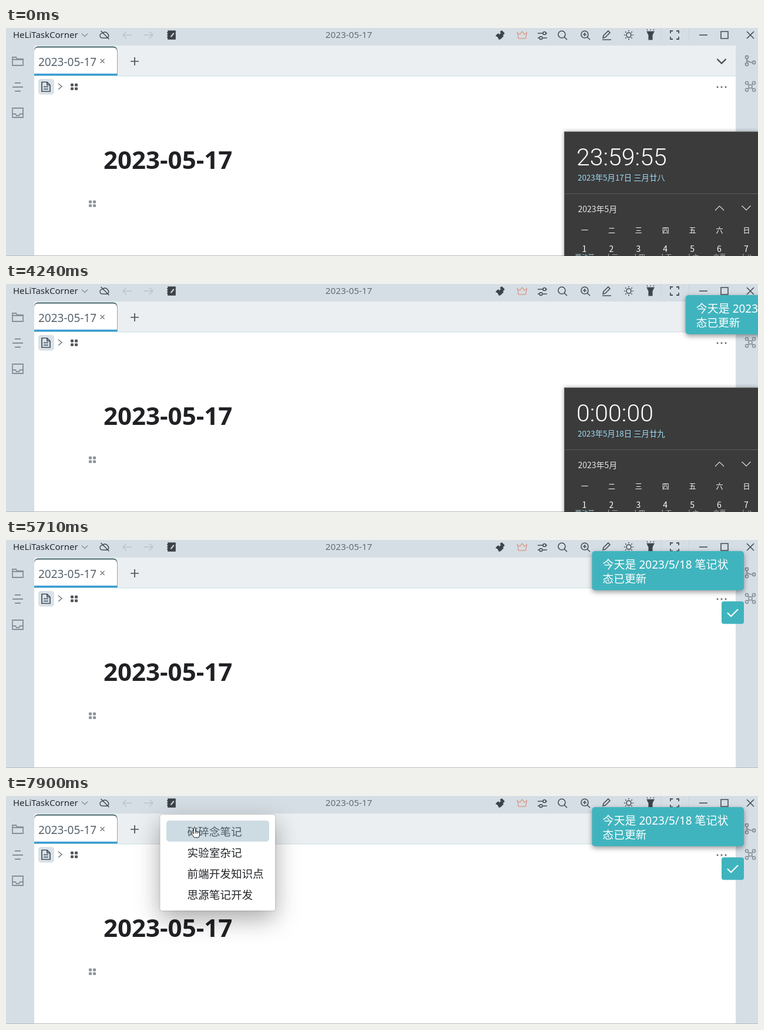
Animation, 1280 px wide and 390 px high, one loop 8000 ms. Source, as an HTML page with a canvas:

```html
<!DOCTYPE html>
<html lang="zh">
<head>
<meta charset="utf-8">
<title>Daily note</title>
<style>
  html, body { margin: 0; width: 100%; height: 100%; overflow: hidden; background: #fff; }
  canvas { display: block; }
</style>
</head>
<body>
<canvas id="stage" width="1280" height="390"></canvas>
<script>
const ctx = document.getElementById('stage').getContext('2d');
const LOOP = 8000;
const SANS = '"Noto Sans", "Noto Sans CJK SC", sans-serif';
const CJK = '"Noto Sans CJK SC", "Noto Sans", sans-serif';
const LIGHT = 'Roboto, "Noto Sans", sans-serif';
const DARK = '#454d54', GREY = '#868f97', BAR = '#d6dee5', TEAL = '#40b4be';

function rect(x, y, w, h, color) {
  ctx.fillStyle = color;
  ctx.fillRect(x, y, w, h);
}

function round(x, y, w, h, r, color) {
  ctx.fillStyle = color;
  ctx.beginPath();
  ctx.roundRect(x, y, w, h, r);
  ctx.fill();
}

function text(str, x, y, size, color, { font = SANS, weight = 400, align = 'left' } = {}) {
  ctx.font = `${weight} ${size}px ${font}`;
  ctx.textAlign = align;
  ctx.fillStyle = color;
  ctx.fillText(str, x, y);
}

// Paths are drawn around their own centre.
function icon(d, x, y, { color = DARK, width = 1.6, fill } = {}) {
  const path = new Path2D(d);
  ctx.save();
  ctx.translate(x, y);
  if (fill) { ctx.fillStyle = fill; ctx.fill(path); }
  if (width) {
    ctx.strokeStyle = color;
    ctx.lineWidth = width;
    ctx.stroke(path);
  }
  ctx.restore();
}

function withShadow(color, blur, dy, draw) {
  ctx.save();
  ctx.shadowColor = color;
  ctx.shadowBlur = blur;
  ctx.shadowOffsetY = dy;
  draw();
  ctx.restore();
}

function circle(r, cx = 0, cy = 0) {
  return `M${cx + r} ${cy}A${r} ${r} 0 1 1 ${cx - r} ${cy}A${r} ${r} 0 1 1 ${cx + r} ${cy}Z`;
}

function blocks(x, y, color) {
  for (const dx of [-6, 1]) for (const dy of [-5.5, 1]) round(x + dx, y + dy, 5, 4.8, 1, color);
}

function topBar(hover) {
  rect(0, 0, 1280, 30, BAR);
  if (hover) rect(262, 0, 37, 30, '#c5cdd4');
  text('HeLiTaskCorner', 12, 17, 15, '#25292d');
  icon('M-5 -2.5L0 2.5L5 -2.5', 134, 12, { color: GREY, width: 1.3 });
  icon('M-5 5H4A4 4 0 0 0 4.5 -2A5 5 0 0 0 -4 -3A4 4 0 0 0 -5 5M-7 -7L7 7', 168.5, 12, { width: 1.5 });
  icon('M8 0H-7M-1 -6L-7 0L-1 6', 206, 12, { color: '#bdc5cc', width: 1.5 });
  icon('M-8 0H7M1 -6L7 0L1 6', 243, 12, { color: '#bdc5cc', width: 1.5 });
  icon('M-5 -7H7V7H-5ZM-7 -4H-4M-7 0H-4M-7 4H-4', 281, 12, { color: '#3b4146', fill: '#3b4146' });
  icon('M-1 4L-.5 1.5L4 -4L5.5 -2.5L1 3Z', 281, 12, { width: 0, fill: BAR });
  text('2023-05-17', 583.5, 17, 15.2, '#626b73', { align: 'center' });

  icon('M-8 1L-3 -3L-1 -1L1 -3L0 -6L3 -8L5 -6L8 -3L5 0L6 2L1 7L-2 8L-4 4Z', 841, 12, { width: 0, fill: '#3d444a' });
  icon('M-6 6H6L8 -4L4 -1L0 -6L-4 -1L-8 -4Z', 878.5, 12, { color: '#d9a08d', width: 1.5 });
  icon('M-8 -4H1M6 -4H8M-8 4H-5M1 4H8' + circle(2.5, 3.5, -4) + circle(2.5, -2.5, 4), 913, 13);
  icon(circle(6, -1, -1) + 'M3.5 3.5L8 8', 947, 12);
  icon(circle(6, -1, -1) + 'M3.5 3.5L8 8M-4 -1H2M-1 -4V2', 986, 12);
  icon('M-6 5L-5 1L3 -7L6 -4L-2 4ZM-7 8H8', 1022, 12);
  let rays = circle(4);
  for (let i = 0; i < 8; i++) {
    const c = Math.cos(i * Math.PI / 4), s = Math.sin(i * Math.PI / 4);
    rays += `M${6.2 * c} ${6.2 * s}L${8.2 * c} ${8.2 * s}`;
  }
  icon(rays, 1060, 12);
  icon('M-6 -5H6L3 1V9H-3V1ZM-6 -9L-5 -7M0 -9V-7M6 -9L5 -7', 1097, 11, { fill: '#3d444a', width: 1.2 });
  icon('M-7 -3V-7H-3M3 -7H7V-3M7 3V7H3M-3 7H-7V3', 1138, 12, { width: 1.8 });
  rect(1114, 0, 1, 24, '#ccd4db');
  rect(1162, 0, 1, 24, '#ccd4db');
  icon('M-7 0H7', 1187, 12);
  icon('M-6 -6H6V6H-6Z', 1223, 12);
  icon('M-6 -6L6 6M6 -6L-6 6', 1267, 12);
}

function docks() {
  rect(0, 30, 48, 360, BAR);
  rect(1242, 30, 38, 360, BAR);
  const side = { color: GREY, width: 1.8 };
  icon('M-9 7V-7H-3L-1 -4H9V7Z M-9 -3H9', 20, 57, side);
  icon('M-5 -7H5M-9 0H9M-5 7H5', 20, 101, side);
  icon('M-9 -8H9V8H-9ZM-9 2H-4L-2 5H2L4 2H9', 20, 145, side);
  icon(circle(2.5, -6, -6) + circle(2.5, -6, 6) + circle(2.5, 6, 3) + 'M-6 -3.5V3.5M-6 -2Q-5 2 3.5 3', 1267, 56, side);
  icon(circle(2.5, -6, -6) + circle(2.5, 6, -6) + circle(2.5, -6, 6) + circle(2.5, 6, 6) + circle(3)
    + 'M-4 -4L-2 -2M4 -4L2 -2M-4 4L-2 2M4 4L2 2', 1267, 100, { color: GREY, width: 1.5 });
}

function editor() {
  rect(48, 30, 1194, 52, '#ebeff1');
  rect(48, 82, 1194, 308, '#fff');
  rect(189, 81.5, 1053, 1, '#c9dae3');
  round(48, 31.5, 141.5, 50, [7, 7, 0, 0], '#45636e');
  round(48, 33.5, 141, 48, [6, 6, 0, 0], '#fff');
  rect(48, 78, 141, 3.5, '#3b9fd1');
  text('2023-05-17', 55, 65, 19, '#56626b');
  icon('M-3.5 -3.5L3.5 3.5M3.5 -3.5L-3.5 3.5', 164, 56.5, { color: '#6d757b', width: 1.2 });
  icon('M-7 0H7M0 -7V7', 219, 57, { width: 1.7 });
  icon('M-7.5 -3.5L0 4L7.5 -3.5', 1218, 56.5, { width: 2.3 });

  round(55, 87, 27, 27, 5, '#dbe2e8');
  icon('M-7 -8H2L7 -3V8H-7ZM2 -8V-3H7M-4 0H4M-4 4H4', 68, 100.5, { color: '#3f4d58', width: 1.7 });
  icon('M-3 -5L3 0L-3 5', 92, 100, { color: '#747c83' });
  blocks(116, 100.5, '#50575d');
  for (const x of [1211, 1218, 1225]) icon(circle(1.5), x, 101, { width: 0, fill: '#5f686f' });
  text('2023-05-17', 166, 241, 42, '#202124', { weight: 700 });
  blocks(147, 300.5, '#8f9397');
  rect(0, 389, 1280, 1, '#b4babd');
}

function titleTools() {
  round(160, 149.5, 79, 26, 5, '#c1c3c5');
  const white = { color: '#fff', width: 1.5 };
  icon('M-7 7V-3L0 -8L7 -3V7Z' + circle(1, 0, -3), 173.5, 163, white);
  icon(circle(7.5) + 'M-4 2Q0 6.5 4 2M-3 -3V-1M3 -3V-1', 199.5, 162.5, white);
  icon('M-8 -7H8V7H-8ZM-8 5L-3 0L0 3L4 -1L8 4' + circle(1, -4, -3), 226.5, 162.5, white);
}

function clockText(t) {
  if (t >= 4110) return t < 5110 ? '0:00:00' : '0:00:01';
  return '23:59:' + (t < 200 ? 55 : 56 + Math.floor((t - 200) / 990));
}

function calendar(t) {
  const closing = t >= 5640;
  ctx.save();
  if (closing) {
    ctx.globalAlpha = 0.5;
    ctx.translate(0, 20);
  }
  withShadow('rgba(0,0,0,.35)', 7, 0, () => rect(950, 177, 331, 240, '#3b3b3b'));
  rect(950, 177, 330, 1, '#6b6b6b');
  rect(950, 177, 1, 213, '#5a5a5a');
  rect(951, 283, 329, 1, '#5e5e5e');
  text(clockText(t), 971, 235, 41, '#fff', { font: LIGHT, weight: 300 });
  text(t < 4110 ? '2023年5月17日 三月廿八' : '2023年5月18日 三月廿九', 973, 261, 13.4, '#9fdcf5', { font: CJK });
  text('2023年5月', 973.5, 314.5, 14, '#e6e6e6', { font: CJK });
  icon('M-7.5 4L0 -3.5L7.5 4', 1214.5, 308, { color: '#ddd', width: 1.2 });
  icon('M-7.5 -4L0 3.5L7.5 -4', 1260, 308, { color: '#ddd', width: 1.2 });
  const lunar = ['劳动节', '十三', '十四', '十五', '十六', '立夏', '十八'];
  [...'一二三四五六日'].forEach((day, i) => {
    const x = 985 + i * 45.9, centre = { font: CJK, align: 'center' };
    text(day, x, 350.5, 12, '#fff', centre);
    text(i + 1, x - 0.5, 383, 14, '#fff', centre);
    text(lunar[i], x, 395.5, 11, i ? '#b5b5b5' : '#9fbfce', centre);
  });
  ctx.restore();
}

function toast(t) {
  const step = Math.min(4, Math.floor((t - 4110) / 85));
  const left = 1 - step / 4;
  ctx.save();
  ctx.translate(283 * left * left, 0);
  withShadow('rgba(0,0,0,.4)', 9, 3, () => round(997.5, 19, 258.5, 67, 5, TEAL));
  text('今天是 2023/5/18 笔记状', 1015.5, 48.5, 19, '#fff');
  text('态已更新', 1015.5, 72.5, 18.7, '#fff');
  round(1218, 105, 38, 38.5, 4, TEAL);
  icon('M-9 0L-3 6L9 -6', 1237, 124.5, { color: '#fff', width: 2 });
  ctx.restore();
}

function tooltip(alpha) {
  ctx.save();
  ctx.globalAlpha = alpha;
  round(222, 36.5, 77, 30.5, 5, '#658396');
  text('今日笔记', 260.5, 57, 14.6, '#fff', { font: CJK, align: 'center' });
  ctx.restore();
}

function menu(active) {
  withShadow('rgba(0,0,0,.34)', 42, 14, () => round(262.5, 32, 195.5, 164, 4, '#fff'));
  withShadow('rgba(0,0,0,.25)', 3, 0, () => round(262.5, 32, 195.5, 164, 4, '#fff'));
  if (active) round(273, 42, 175, 36, 5, '#cddbe3');
  ['碎碎念笔记', '实验室杂记', '前端开发知识点', '思源笔记开发'].forEach((label, i) =>
    text(label, 308.5, 68 + i * 36, 18.6, i || !active ? '#202326' : '#4a5a66', { font: CJK }));
}

const TRACK = [
  [6170, 572, 314], [6310, 500, 262], [6450, 420, 205], [6590, 345, 145], [6730, 308, 103],
  [6940, 290, 50], [7010, 287, 38], [7080, 284, 26], [7150, 284, 22], [7620, 284, 22],
  [7690, 292, 31], [7760, 304, 43], [7830, 315, 51], [7900, 321, 54], [8000, 321, 54]
];

function pointer(t) {
  const base = t < 7420 ? 6170 : t < 7690 ? 7420 : 7690;
  const now = base + Math.floor((t - base) / 70) * 70;
  const i = Math.max(1, TRACK.findIndex(p => p[0] > now));
  const [a, b] = [TRACK[i - 1], TRACK[i]];
  const k = (now - a[0]) / (b[0] - a[0]);
  return [a[1] + (b[1] - a[1]) * k, a[2] + (b[2] - a[2]) * k];
}

const ARROW = 'M.5 .5V13L3.2 10.4L5 14.5L7 13.6L5.2 9.7H9Z';
const HAND = 'M-1.6 1.6Q0 -1 1.6 1.6V6.5L6 7.5Q8.5 8 8.5 10.5V13L7 17H-.5L-5 11Q-5.5 8.5 -3.5 9L-1.6 10.5ZM1.6 7V10M4.2 8V10.5';

function draw(t) {
  const hover = t >= 7080 && t < 7690;
  topBar(hover);
  docks();
  editor();
  if (t >= 6450 && t < 6870) titleTools();
  if (t < 5710) calendar(t);
  if (t >= 4110) toast(t);
  if (t >= 7490) menu(t >= 7830);
  if (t >= 7290 && t < 7690) tooltip(t < 7360 ? 0.4 : t < 7420 ? 0.8 : 1);
  if (t >= 7290 && t < 7490) icon(circle(10.5), 283.5, 21, { width: 0, fill: 'rgba(232,216,30,.78)' });
  if (t >= 6170) {
    const [x, y] = pointer(t);
    icon(t < 7080 ? ARROW : HAND, x, y, { color: '#222', width: 1, fill: '#fff' });
  }
}

function tick() {
  draw(performance.now() % LOOP);
  requestAnimationFrame(tick);
}
tick();
</script>
</body>
</html>
```
